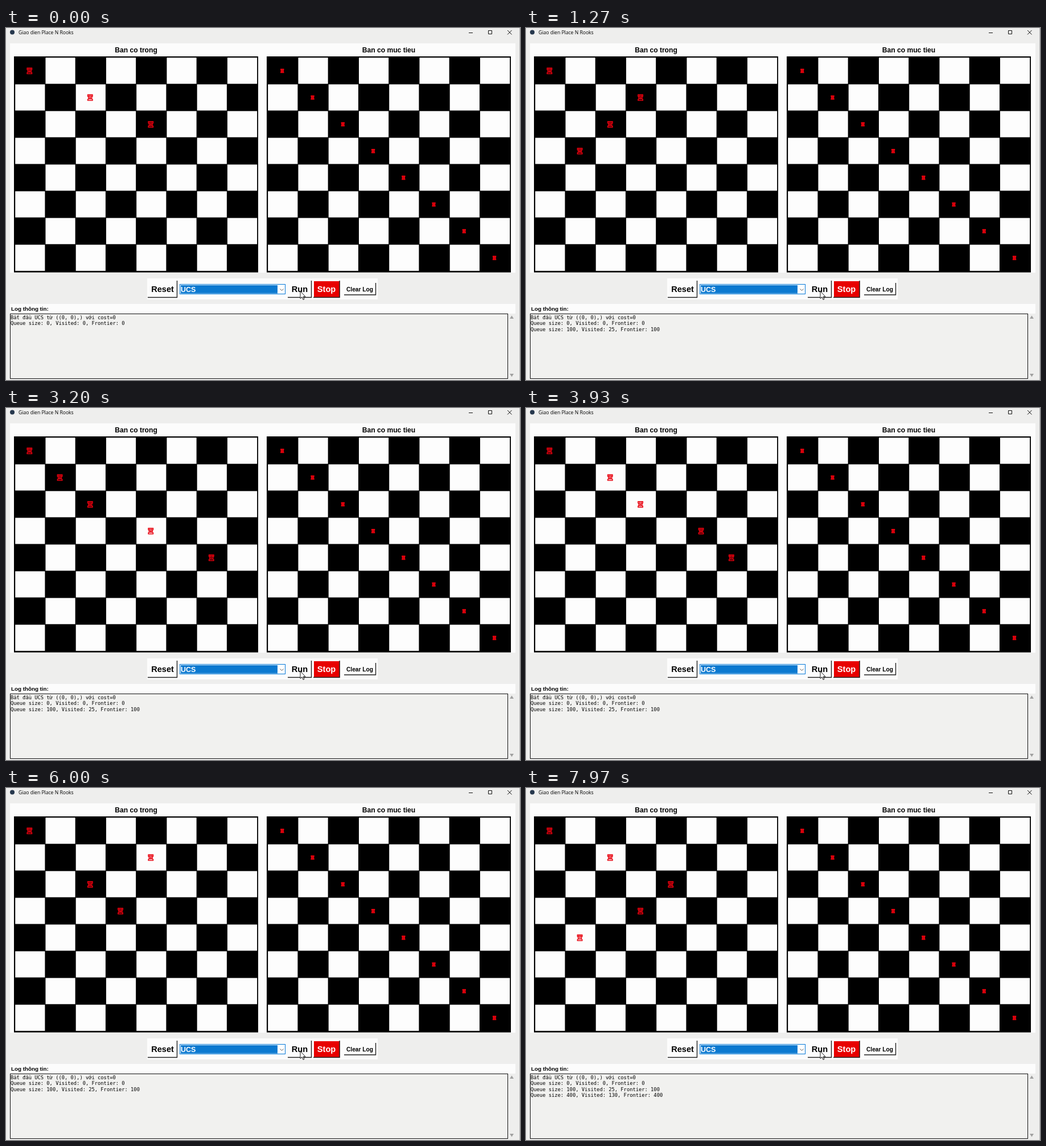
These frames come from a looping animation (903x620 px, 8 s). An HTML page:

```html
<!DOCTYPE html>
<html lang="vi">
<head>
<meta charset="utf-8">
<title>Giao dien Place N Rooks</title>
<style>
  html, body { margin: 0; width: 100%; height: 100%; overflow: hidden; background: #eeeeed; }
  svg { display: block; width: 903px; height: 620px; }
  text { fill: #000; white-space: pre; }
  .title { font: 8.6px "Open Sans", sans-serif; }
  .bold { font-family: "Liberation Sans", Arial, sans-serif; font-weight: bold; }
  .head { font-size: 12.1px; text-anchor: middle; }
  .button { font-size: 14.6px; text-anchor: middle; }
  .small { font-size: 10.2px; text-anchor: middle; }
  .log { font: 8.77px "DejaVu Sans Mono", monospace; }
  .light { fill: #fff; }
  .panel { fill: #fcfcfc; }
</style>
</head>
<body>
<svg viewBox="0 0 903 620">
  <defs>
    <g id="rook" fill="none" stroke="#e8000e">
      <path d="M-4.1-4.9V-2.2L-2.8-1V2L-4.1 3.2V5H4.1V3.2L2.8 2V-1L4.1-2.2V-4.9Z" stroke-width="1.6"/>
      <path d="M-1.5-5V-3M1.5-5V-3M-3.5-2.4H3.5M-2.5 2.4H2.5M-1.6-1.4L1.6 1.8M1.6-1.4L-1.6 1.8" stroke-width="1.2"/>
    </g>
    <g id="goal">
      <path d="M-3.2-3.7H3.2V-1.8L2.7-1.2V1.4L3.2 2V3.7H-3.2V2L-2.7 1.4V-1.2L-3.2-1.8Z" fill="#f0000c"/>
      <path d="M-1.5-1.2H1.8M-1.5 1.4H1.8" stroke="#8c0008" stroke-width=".7"/>
    </g>
  </defs>

  <circle cx="11" cy="7.5" r="4" fill="#26374d"/>
  <text class="title" x="22" y="11">Giao dien Place N Rooks</text>
  <path d="M813 8.5H820M847.5 4.5H853.5V10.5H847.5ZM881 4L888.5 11.5M888.5 4L881 11.5" fill="none" stroke="#111"/>
  <path d="M902.5 0V620" stroke="#b4b4b4"/>

  <rect class="panel" x="7" y="27" width="888" height="404"/>
  <text class="bold head" x="228.5" y="43">Ban co trong</text>
  <text class="bold head" x="672.5" y="43">Ban co muc tieu</text>
  <g id="boards"></g>
  <g id="rooks"></g>

  <rect class="panel" x="248" y="441" width="405" height="37"/>
  <g id="buttons"></g>
  <text class="bold button" x="275" y="465">Reset</text>
  <text class="bold button" x="516" y="465">Run</text>
  <text class="bold button light" x="563" y="465">Stop</text>
  <text class="bold small" x="621.5" y="464">Clear Log</text>

  <rect x="305.5" y="451.5" width="185" height="17" fill="#fff" stroke="#0078d7"/>
  <rect x="307" y="453" width="170" height="14.5" fill="#0b79d0"/>
  <text class="bold light" font-size="12.5" x="307" y="464.5">UCS</text>
  <path d="M481.5 459.5L484.5 462.5L487.5 459.5" fill="none" stroke="#555"/>
  <path d="M517 463.5V476.5L520 473.8L522 478.5L524 477.6L522 473.2H526Z" fill="#fff" stroke="#000" stroke-width=".9"/>

  <rect class="panel" x="7" y="486" width="888" height="17"/>
  <text class="bold" font-size="9.8" x="9" y="498">Log thông tin:</text>
  <rect x="7.5" y="503.5" width="874" height="114" fill="#f1f1ef" stroke="#111"/>
  <path d="M885 512H892L888.5 506.5ZM885 609H892L888.5 614.5Z" fill="#a0a0a0"/>
  <g id="log"></g>
</svg>
<script>
const PERIOD = 8000, STEP = 52.6, LEAD = 26, FIRST = 12, LAST = 163;
const N = 8, CELL_W = 53.25, CELL_H = 47.07;
const layer = id => document.getElementById(id);

function add(parent, tag, attrs, text = '') {
  const node = document.createElementNS('http://www.w3.org/2000/svg', tag);
  for (const key in attrs) node.setAttribute(key, attrs[key]);
  node.textContent = text;
  parent.append(node);
  return node;
}

function place(node, left, row, col) {
  node.setAttribute('transform',
    `translate(${left + 27.3 + CELL_W * col} ${75.5 + CELL_H * row})`);
}

function drawBoard(left) {
  const board = layer('boards');
  add(board, 'rect', { x: left, y: 50, width: 429, height: 380.5 });
  for (let row = 0; row < N; row++) {
    for (let col = 1 - row % 2; col < N; col += 2) {
      add(board, 'rect', {
        x: left + 2.2 + CELL_W * col, y: 52.2 + CELL_H * row,
        width: 52.2, height: 46.1, fill: '#fdfdfd'
      });
    }
  }
}

function drawButton(x, y, width, height, fill) {
  const group = layer('buttons');
  add(group, 'rect', { x: x + 1, y: y + 1, width: width - 1, height: height - 1, fill });
  add(group, 'path', {
    d: `M${x} ${y + height - .5}H${x + width - .5}V${y}`,
    fill: 'none', stroke: '#222', 'stroke-width': 1.4
  });
}

// Uniform-cost order: ties are broken by comparing the columns.
function searchOrder(maxCost) {
  const states = [];
  (function expand(cols, cost) {
    states.push({ cols, cost });
    const from = cols[cols.length - 1];
    for (let col = 0; col < N; col++) {
      const next = cost + 2 * Math.abs(col - from) + 1;
      if (!cols.includes(col) && next <= maxCost) expand([...cols, col], next);
    }
  })([0], 0);
  return states.sort((a, b) => a.cost - b.cost).map(s => s.cols);
}

drawBoard(14);
drawBoard(458);
for (let i = 0; i < N; i++) place(add(layer('boards'), 'use', { href: '#goal' }), 458, i, i);

drawButton(249, 445, 52, 30, '#fcfcfc');
drawButton(495, 445, 42, 30, '#fcfcfc');
drawButton(540, 445, 46.5, 30, '#e80000');
drawButton(594, 449, 56, 21.5, '#fcfcfc');

const rooks = Array.from({ length: N }, () => add(layer('rooks'), 'use', { href: '#rook' }));
const status = (queue, visited) => `Queue size: ${queue}, Visited: ${visited}, Frontier: ${queue}`;
const logLines = [
  [0, 'Bắt đầu UCS từ ((0, 0),) với cost=0'],
  [0, status(0, 0)],
  [25, status(100, 25)],
  [130, status(400, 130)]
].map(([from, text], i) => ({
  from, node: add(layer('log'), 'text', { class: 'log', x: 8, y: 512.5 + 10.5 * i }, text)
}));

const order = searchOrder(18);
const show = (node, visible) => { node.style.display = visible ? '' : 'none'; };

function render() {
  const time = performance.now() % PERIOD;
  const visited = Math.min(LAST, FIRST + Math.floor((time + LEAD) / STEP));
  const cols = order[visited - 1];
  rooks.forEach((rook, row) => {
    show(rook, row < cols.length);
    if (row < cols.length) place(rook, 14, row, cols[row]);
  });
  logLines.forEach(({ from, node }) => show(node, visited >= from));
  requestAnimationFrame(render);
}
render();
</script>
</body>
</html>
```
